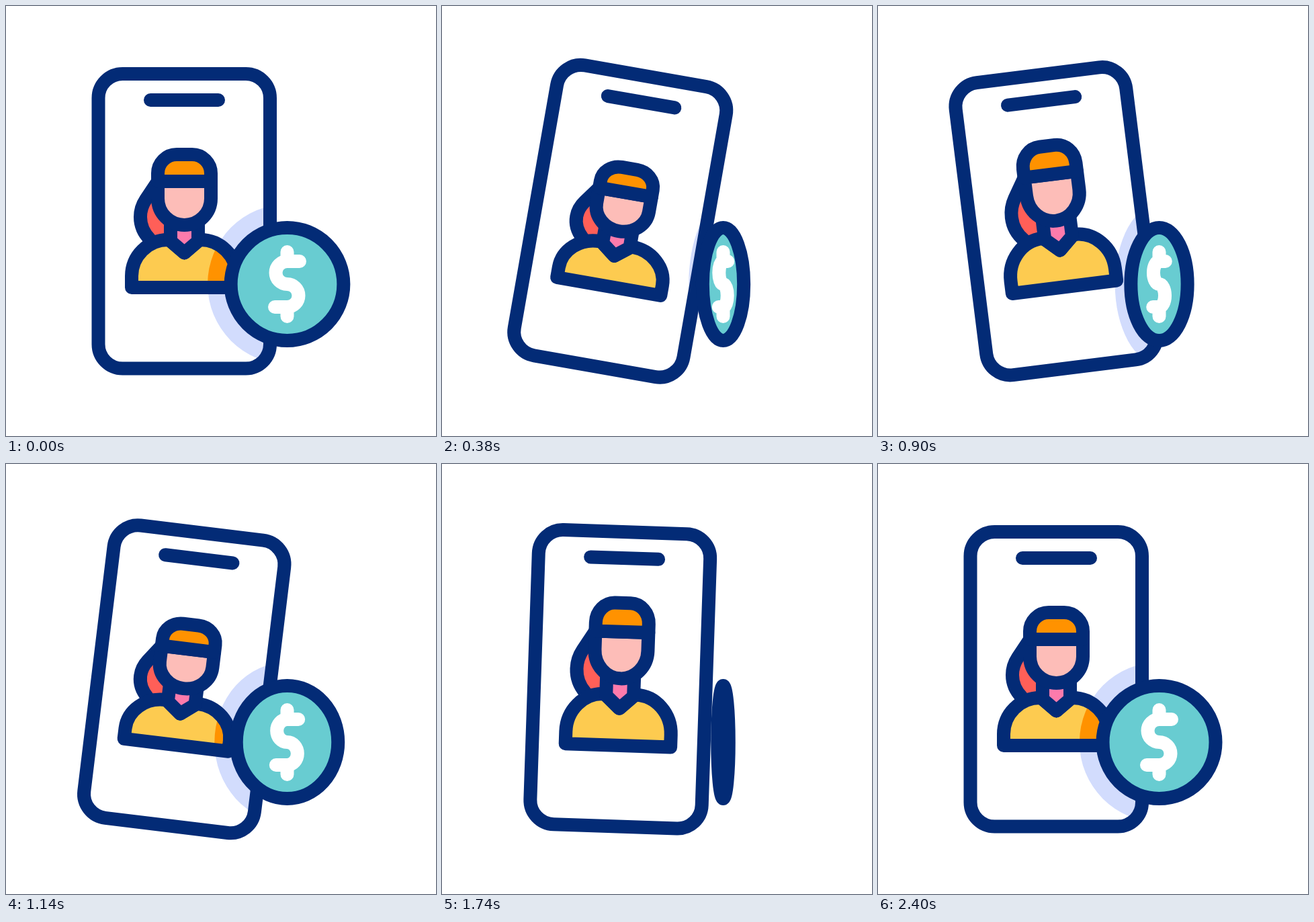
Write an HTML page with a canvas that moves like this. It is 640 px wide and 640 px high and loops after 2420 ms.

```html
<!DOCTYPE html>
<html lang="en">
<head>
<meta charset="utf-8">
<title>Mobile payment</title>
<style>
  html, body { margin: 0; width: 100%; height: 100%; overflow: hidden; background: #fff; }
  canvas { display: block; width: 640px; height: 640px; }
</style>
</head>
<body>
<canvas id="stage" width="640" height="640"></canvas>
<script>
const ctx = document.getElementById('stage').getContext('2d');
const LOOP = 2420, END = 2400, LINE = 20;
const NAVY = '#032b76', ORANGE = '#ff9200';
const CX = 265.25, CY = 320.25, BASE = 419;
const COIN = { x: 418.5, y: 414, r: 84 };

// [time, value] keys, eased in and out between neighbours
const TILT = [[0, 0], [400, 10], [800, -10], [1200, 8], [1520, -6], [1832, 4], [2160, 0]];
const STRETCH = [[0, 1], [400, .9], [800, 1.1], [1200, .9], [1600, 1.1], [2000, 1]];

const phone = new Path2D();
phone.roundRect(137.5, 101, 255.5, 438.5, 36);
const slot = new Path2D('M215 140H316');

const tail = new Path2D('M226 261L208 288Q200 300 200 314Q200 333 214 347');
const tailFill = new Path2D('M226 261L208 288Q200 300 200 314Q200 333 214 347L245 350V261Z');
const neck = new Path2D('M245 322V350L265.5 367.5L286 350V322');
const face = new Path2D('M226 261V286.5A39.5 39.5 0 0 0 305 286.5V261Z');
const cap = new Path2D('M226 261V249A28 28 0 0 1 254 221H277A28 28 0 0 1 305 249V261Z');
const body = new Path2D('M187 419V402A54 54 0 0 1 241 348H243L265.5 367.5L288 348H289.5A54 54 0 0 1 343.5 402V419Z');

const dollar = new Path2D('M18.5 -34H0A17 17 0 0 0 0 0A17 17 0 0 1 0 34H-18.5M0 -48V-34M0 34V48');

function tween(keys, t) {
  for (let i = 1; i < keys.length; i++) {
    const [t0, a] = keys[i - 1], [t1, b] = keys[i];
    if (t < t1) {
      const p = (t - t0) / (t1 - t0);
      return a + (b - a) * p * p * (3 - 2 * p);
    }
  }
  return keys[keys.length - 1][1];
}

// Transforms the outline only, so line weights stay constant
function shaped(path, m) {
  const p = new Path2D();
  p.addPath(path, m);
  return p;
}

function oval(rx, ry) {
  const p = new Path2D();
  p.ellipse(COIN.x, COIN.y, rx, ry, 0, 0, 2 * Math.PI);
  return p;
}

function paint(path, fill, line) {
  if (fill) { ctx.fillStyle = fill; ctx.fill(path); }
  if (line) { ctx.strokeStyle = line; ctx.stroke(path); }
}

function clipped(area, path, fill) {
  ctx.save();
  ctx.clip(area);
  paint(path, fill);
  ctx.restore();
}

function draw(t) {
  const turn = new DOMMatrix().translate(CX, CY).rotate(tween(TILT, t)).translate(-CX, -CY);
  const pose = turn.translate(0, BASE).scale(1, tween(STRETCH, t)).translate(0, -BASE);
  const flip = Math.abs(1 - (t % 1200) / 600);
  const rx = Math.max(COIN.r * flip, .2);
  const halo = oval((rx + LINE / 2) * 1.262, 119);
  const frame = shaped(phone, turn);
  const torso = shaped(body, pose);

  ctx.fillStyle = '#fff';
  ctx.fillRect(0, 0, 640, 640);
  ctx.lineWidth = LINE;
  ctx.lineCap = ctx.lineJoin = 'round';

  clipped(frame, halo, '#d2dcfd');
  paint(frame, null, NAVY);
  paint(shaped(slot, turn), null, NAVY);

  paint(shaped(tailFill, pose), '#ff5f58');
  paint(shaped(tail, pose), null, NAVY);
  paint(torso, '#fdcb50');
  clipped(torso, halo, ORANGE);
  paint(torso, null, NAVY);
  paint(shaped(neck, pose), '#fd7bac', NAVY);
  paint(shaped(face, pose), '#fdbdb8', NAVY);
  paint(shaped(cap, pose), ORANGE, NAVY);

  const coin = oval(rx, COIN.r);
  paint(coin, '#68ccd1');
  paint(shaped(dollar, new DOMMatrix([flip, 0, 0, 1, COIN.x, COIN.y])), null, '#fff');
  paint(coin, null, NAVY);
}

const start = performance.now();
function tick() {
  draw(Math.min((performance.now() - start) % LOOP, END - .001));
  requestAnimationFrame(tick);
}
tick();
</script>
</body>
</html>
```
